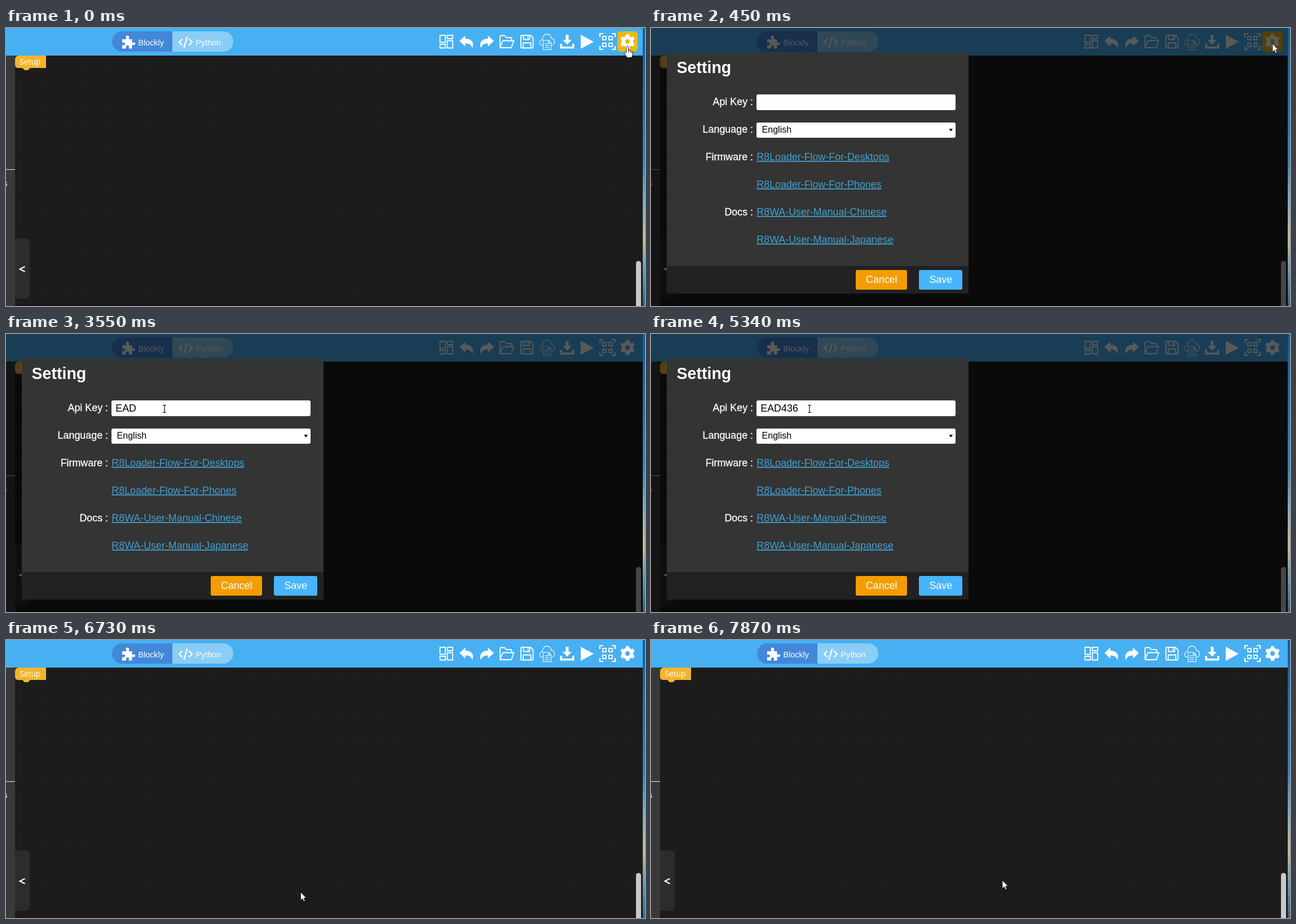
An HTML page that plays this animation: 1133x494 px, repeating every 8000 ms.

```html
<!DOCTYPE html>
<html lang="en">
<head>
<meta charset="utf-8">
<title>Settings dialog</title>
<style>
html, body { margin: 0; width: 100%; height: 100%; overflow: hidden; background: #1c1c1c; }
svg { display: block; font-family: "Liberation Sans", Arial, sans-serif; }
.line { fill: none; stroke: #fff; stroke-width: 1.8; stroke-linejoin: round; stroke-linecap: round; }
.form { font-size: 17.86px; fill: #fff; }
.label { text-anchor: end; stroke: #fff; stroke-width: .3; }
.link { fill: #429fd2; text-decoration: underline; }
.mid { text-anchor: middle; }
</style>
</head>
<body>
<svg width="1133" height="494" viewBox="0 0 1133 494">
  <defs>
    <linearGradient id="desk" x2="0" y2="1">
      <stop offset="0" stop-color="#0f5c9c"/>
      <stop offset=".48" stop-color="#3584ba"/>
      <stop offset=".62" stop-color="#7fabbd"/>
      <stop offset=".76" stop-color="#c6bd90"/>
      <stop offset=".86" stop-color="#6d9db5"/>
      <stop offset="1" stop-color="#2f6488"/>
    </linearGradient>
  </defs>

  <!-- workspace -->
  <rect width="1129" height="494" fill="#1c1c1c"/>
  <path id="dots" fill="#404040"/>
  <rect y="490" width="1129" height="4" fill="#21161a"/>
  <rect y="49" width="16" height="445" fill="#393939"/>
  <rect y="251" width="16" height="1" fill="#eee"/>
  <text x="2.5" y="281" font-size="14.3" fill="#fff" text-anchor="end">s</text>
  <path d="M16 374H34Q42 374 42 382V473Q42 481 34 481H16Z" fill="#2c2c2c"/>
  <path d="M33.5 424L24.5 428.5L33.5 433" fill="none" stroke="#fff" stroke-width="2"/>
  <path d="M16 56Q16 49 23 49H71V71H43L39 75H33L29 71H22Q16 71 16 65Z" fill="#f3b52e"/>
  <text x="24.5" y="65" font-size="13.6" fill="#fff" font-family="Open Sans, sans-serif">Setup</text>
  <path d="M1117 494V418.5a4.5 4.5 0 0 1 9 0V494Z" fill="#c8c8c8"/>

  <!-- header -->
  <rect width="1129" height="49" fill="#47b0f2"/>
  <path d="M295 6H206a18 18 0 0 0 0 36H295Z" fill="#4387d9"/>
  <path d="M295 6H385a18 18 0 0 1 0 36H295Z" fill="#8acdf7"/>
  <g fill="#fff" font-size="14.3">
    <text x="234.5" y="31">Blockly</text>
    <text x="336.5" y="31">Python</text>
    <path d="M206 20H212.5Q214 19.5 213 17.5C210.5 12 220 12 218 17.5Q217.3 19.5 219 20H223.500V25Q224 27 226 25.700C230 23.500 230 32 226 30Q224 29 223.500 31V36.500H218.500Q217 36 218 34C219.500 30 211.500 30 213 34Q214 36 212.500 36.500H206V31.500Q206 29.500 208 30.500C212 32 212 24.500 208 26Q206 27 206 25Z"/>
  </g>
  <path class="line" style="stroke-width:2.4" d="M312 20L307 25L312 30M325 20L330 25L325 30M321 16.500L316 34"/>

  <g class="line">
    <path d="M769.5 13H779V25.5H769.5ZM769.5 29H779V35.5H769.5ZM782.5 13H792V19H782.5ZM782.5 22.5H792V35.5H782.5Z"/>
    <path d="M876 34V15Q876 13.5 877.5 13.5H884L887 17H895Q896.5 17 896.5 18.5V22M876 34.5L881 22.5H900.5L896 35H877Q876 35 876 34"/>
    <path d="M914.5 13H930L934.5 17.5V34Q934.5 35.5 933 35.5H914.5Q913 35.5 913 34V14.5Q913 13 914.5 13ZM917.5 13.5V20.5H928.5V13.5M925.5 15.5V18M917 35V26.5H930.5V35"/>
    <path d="M952 30.5H950C945 29.5 945 21 951.5 20.5C951 8 966.5 8 967 18.5C974.5 19 974 30 968 30.5M952.5 22H962L966.5 26.5V38.5H952.5ZM962 22V26.5H966M955.5 28H963M955.5 31.5H963M955.5 35H963" style="stroke-width:1.1"/>
    <path d="M1053 16V10H1059M1074 10H1080V16M1080 32V38H1074M1059 38H1053V32" style="stroke-width:2.2;stroke-linecap:butt"/>
    <path d="M1058 15H1064V21H1058ZM1069 15H1075V21H1069ZM1058 27H1064V33H1058ZM1069 27H1075V33H1069Z"/>
  </g>
  <g fill="#fff">
    <path id="undo" d="M804 23L814.5 13.5V19C825 19 830.5 25 827 36C825.5 30 822 27.5 814.5 27.5V33Z"/>
    <use href="#undo" transform="matrix(-1 0 0 1 1669 0)"/>
    <path d="M992.5 12H997.5V21H1003L995 29.5L987 21H992.5ZM982.5 28H986V33H1004V28H1007.5V36.5H982.5Z"/>
    <path d="M1019 12L1042 24.5L1019 37Z"/>
  </g>
  <rect id="hover" x="1084" y="6" width="36" height="36" rx="5" fill="#efb80c"/>
  <g id="gear" transform="translate(1102 24)" stroke="#fff" fill="none">
    <circle r="7.5" stroke-width="5.6"/>
  </g>

  <!-- dialog -->
  <g id="dialog">
    <rect width="1129" height="494" opacity=".65"/>
    <rect x="28" y="44" width="535" height="428" rx="3" fill="#212121"/>
    <path d="M28 423V47Q28 44 31 44H560Q563 44 563 47V423Z" fill="#333433"/>
    <text x="45.5" y="80" font-size="28.57" font-weight="bold" fill="#fff">Setting</text>
    <g class="form label">
      <text x="181" y="137">Api Key :</text>
      <text x="181" y="186">Language :</text>
      <text x="181" y="235">Firmware :</text>
      <text x="181" y="333">Docs :</text>
    </g>
    <rect x="187" y="118" width="353" height="28" rx="3" fill="#fff"/>
    <rect x="187" y="168" width="353" height="27" rx="3" fill="#fff"/>
    <text x="196.5" y="186" font-size="16.07">English</text>
    <path d="M528.5 179H535L531.75 184Z"/>
    <text id="key" x="194.3" y="137.5" font-size="17.86"></text>
    <rect id="caret" y="122" width="1" height="19"/>
    <g class="form">
      <text class="link" x="187.3" y="235">R8Loader-Flow-For-Desktops</text>
      <text class="link" x="187.3" y="284">R8Loader-Flow-For-Phones</text>
      <text class="link" x="187.3" y="333">R8WA-User-Manual-Chinese</text>
      <text class="link" x="187.3" y="382">R8WA-User-Manual-Japanese</text>
      <rect x="363" y="430" width="91" height="35" rx="3" fill="#f39d02"/>
      <rect x="475" y="430" width="77" height="35" rx="3" fill="#48b4fc"/>
      <text class="mid" x="408.7" y="453">Cancel</text>
      <text class="mid" x="513.8" y="453">Save</text>
    </g>
  </g>

  <!-- pointer -->
  <g id="pointer">
    <circle id="ring" r="9" fill="none" stroke="#111" stroke-width="1.2" opacity=".8"/>
    <path id="arrow" d="M0 0V14.5L3.3 11.5L5.5 16.5L7.8 15.5L5.6 10.6H10Z" fill="#fff" stroke="#000" stroke-width=".7"/>
    <path id="hand" d="M-2 12V1.6Q-2 0-.2 0T1.6 1.6V7.5Q4.5 6.5 4.8 8.5Q7 7.7 7.3 9.5Q9 9 9 11V15Q9 18 7 20.5H-1Q-2 18-5.5 13Q-6.5 11-4.8 10.5Q-3.5 10.3-2 12ZM1.6 7.5V12M4.8 8.5V12M7.3 9.5V12.5" fill="#fff" stroke="#000" stroke-width=".8"/>
    <path id="beam" d="M-3-6.5H-1L0-5.5L1-6.5H3M0-5.5V5.5M-3 6.5H-1L0 5.5L1 6.5H3" fill="none" stroke="#000" stroke-width="1.2"/>
  </g>
  <rect x="1129" width="4" height="494" fill="url(#desk)"/>
</svg>
<script>
const LOOP = 8000;
const el = id => document.getElementById(id);
const show = (id, on) => el(id).style.display = on ? "" : "none";
const within = (t, ...spans) => spans.some(([a, b]) => t >= a && t < b);

// time, shape, x, y
const moves = [
  [0, "hand", 1102, 32], [150, "hand", 1102, 28], [450, "arrow", 1102, 28],
  [600, "arrow", 960, 105], [720, "arrow", 640, 180], [840, "arrow", 390, 193],
  [960, "arrow", 280, 146], [1110, "beam", 281, 133], [5620, "beam", 283.5, 134.5],
  [5770, "arrow", 339, 210], [5920, "arrow", 418, 318], [6040, "arrow", 476, 399],
  [6190, "hand", 530, 444], [6310, "hand", 529, 449], [6460, "hand", 524, 448],
  [6730, "arrow", 522.5, 448], [7600, "arrow", 526, 443], [7720, "arrow", 531, 435],
  [7870, "arrow", 623, 427]
];
const keyTimes = [2340, 2620, 2990, 3980, 4280, 4810];

const step = 17.86;
let dots = "";
for (let y = 57.9; y < 490; y += step)
  for (let x = 25.3; x < 1117; x += step)
    dots += `M${Math.round(x)} ${Math.round(y)}h1v1h-1z`;
el("dots").setAttribute("d", dots);

for (let a = 30; a < 390; a += 60)
  el("gear").innerHTML += `<path d="M7 0H10" stroke-width="6" stroke-linecap="square" transform="rotate(${a})"/>`;

function draw(t) {
  const [, shape, x, y] = moves.findLast(m => m[0] <= t);
  for (const id of ["arrow", "hand", "beam"]) show(id, id === shape);
  el("pointer").setAttribute("transform", `translate(${x} ${y})`);
  show("ring", within(t, [300, 450], [1230, 1350], [6580, 6730]));
  show("hover", t < 600);
  show("dialog", within(t, [450, 6730]));

  const key = el("key");
  key.textContent = "EAD436".slice(0, keyTimes.filter(k => k <= t).length);
  show("caret", within(t, [1230, 1750], [2340, 3550], [3980, 5340], [5920, 6460]));
  const width = key.textContent ? key.getComputedTextLength() : 0;
  el("caret").setAttribute("x", Math.floor(194.3 + width));
}

const start = performance.now();
function tick() {
  draw((performance.now() - start) % LOOP);
  requestAnimationFrame(tick);
}
tick();
</script>
</body>
</html>
```
